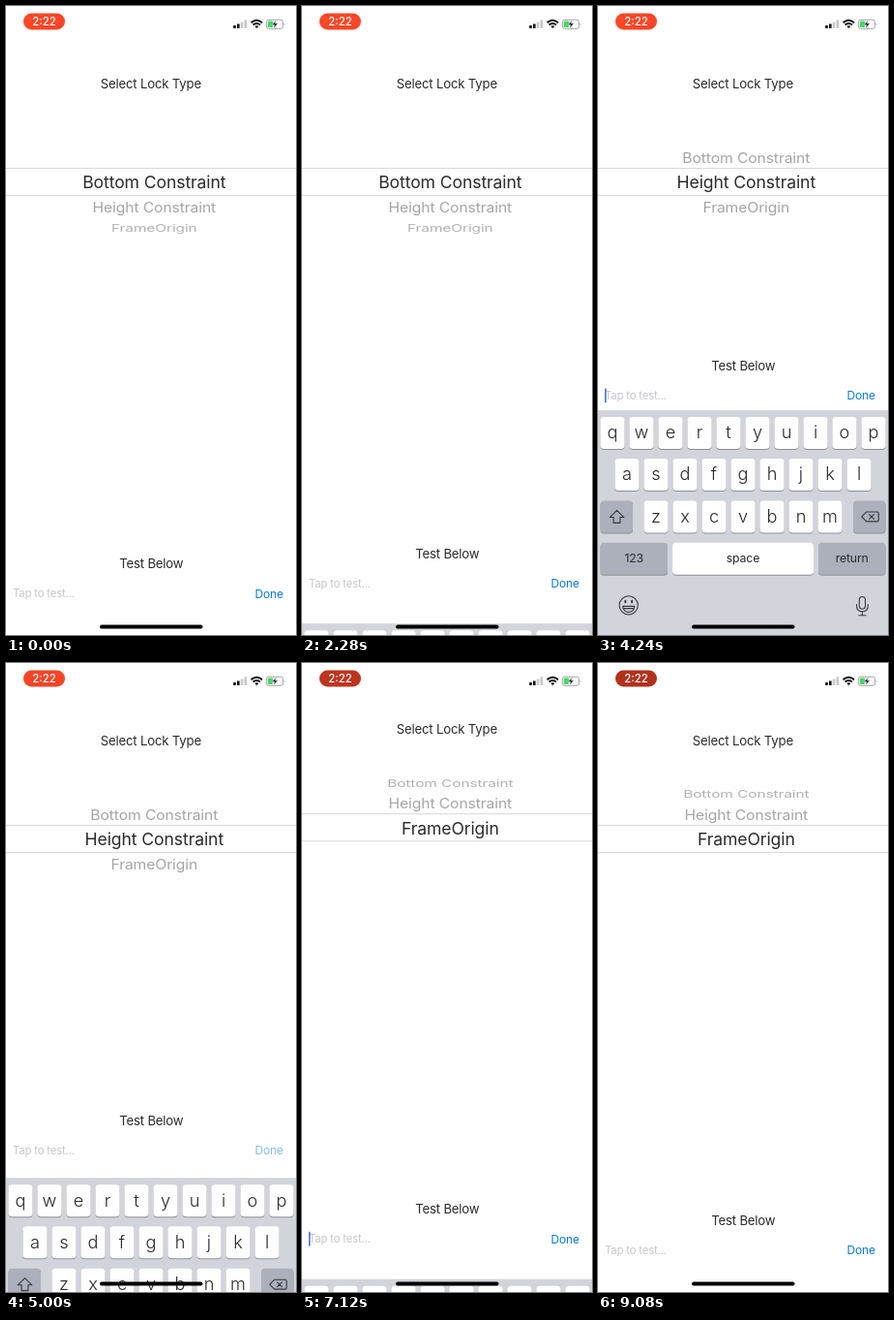
Recreate the animation shown at these times as an HTML page. Size 300 by 649 pixels, loop 9120 ms.

```html
<!DOCTYPE html>
<html lang="en">
<head>
<meta charset="utf-8">
<title>Keyboard lock demo</title>
<style>
  html, body { margin: 0; height: 100%; overflow: hidden; background: #fefefe; }
  svg { display: block; width: 100vw; height: 100vh; }
  text { font-family: Inter, Roboto, sans-serif; letter-spacing: -.014em; fill: #2b2b2e; }
  .mid { text-anchor: middle; }
  .label { font-size: 13.2px; }
  .item { font-size: 17.6px; letter-spacing: -.006em; }
  .letter { font-size: 18.2px; font-weight: 300; letter-spacing: 0; }
  .word { font-size: 12.3px; }
  .line { fill: none; stroke: #37383c; stroke-linecap: round; stroke-linejoin: round; }
</style>
</head>
<body>
<svg viewBox="0 0 300 649" preserveAspectRatio="none">
  <defs>
    <clipPath id="inLens"><rect y="168" width="300" height="27"/></clipPath>
    <clipPath id="offLens"><rect y="100" width="300" height="68"/><rect y="195" width="300" height="70"/></clipPath>
  </defs>

  <g id="page">
    <text class="mid label" x="149.8" y="84.6">Select Lock Type</text>
    <path d="M0 167.5H300M0 195.5H300" stroke="#d9d9dd"/>
    <g id="wheel" clip-path="url(#offLens)"></g>
    <g id="lens" clip-path="url(#inLens)"></g>
  </g>

  <g id="row">
    <text class="mid label" x="150.3" y="580.2">Test Below</text>
    <text x="7" y="610.2" font-size="11.3" style="fill:#c8c8cd">Tap to test...</text>
    <rect id="caret" x="7" y="598.5" width="1.6" height="15" rx=".8" fill="#4a6fd8"/>
    <text id="done" x="257.6" y="610.5" font-size="12" style="fill:#0b7ad8">Done</text>
  </g>

  <g id="keyboard">
    <rect y="416" width="300" height="234" fill="#d2d4db"/>
    <g id="keys"></g>
    <path class="line" stroke-width="1.1" d="M19.5 519.3l-7.3 7.2h3.9v5.8h6.8v-5.8h3.9z"/>
    <path class="line" stroke-width="1.1" d="M277.6 521h11.2q1.4 0 1.4 1.4v7q0 1.4-1.4 1.4h-11.2l-4.8-4.9zM280.6 523.6l4.8 4.7m0-4.7l-4.8 4.7"/>
    <g class="line" stroke-width="1.1">
      <circle cx="31.7" cy="617.3" r="9.6"/>
      <path d="M25.6 618.3h12.2q-.8 6-6.1 6t-6.1-6zM26.3 620.6h10.8"/>
      <path d="M28.3 612.6v1.6m6.8-1.6v1.6" stroke-width="1.9"/>
      <rect x="270.3" y="608.5" width="6.2" height="12.5" rx="3.1"/>
      <path d="M267.6 616.5v1.6q0 5.6 5.8 5.6t5.8-5.6v-1.6M273.4 623.7v4M269.8 627.7h7.2"/>
    </g>
  </g>

  <g id="status">
    <rect id="pill" x="18" y="7.4" width="43" height="17" rx="8.5"/>
    <text class="mid" x="39.5" y="19.9" font-size="11.4" font-weight="500" style="fill:#fff;letter-spacing:0">2:22</text>
    <path d="M235.2 20h2.6v3h-2.6zM239 18.4h2.6v4.6H239z" fill="#111"/>
    <path d="M242.8 16.5h2.6v6.5h-2.6zM246.6 14.3h2.6v8.7h-2.6z" fill="#c9c9cb"/>
    <path d="M253.6 17.3q5.7-5 11.4 0M255.6 19.5q3.7-3.1 7.4 0" fill="none" stroke="#111" stroke-width="1.9"/>
    <path d="M257.3 21q2-1.5 4 0l-2 2.1z" fill="#111"/>
    <rect x="269.4" y="14.2" width="17.2" height="9.2" rx="2.4" fill="none" stroke="#9c9ca0" stroke-width=".9"/>
    <path d="M287.7 17.2q1.6 1.5 0 3.2z" fill="#9c9ca0"/>
    <rect x="270.8" y="15.6" width="5.4" height="6.4" rx="1.2" fill="#45d765"/>
    <path d="M279.6 14.8l-4.4 4.7h2.6l-1 3.4 4.4-4.8h-2.7z" fill="#111" stroke="#fff" stroke-width=".4"/>
  </g>
  <rect x="97" y="638.6" width="106.5" height="4" rx="2" fill="#000"/>
</svg>

<script>
const LOOP = 9120;
const KEYBOARD_HEIGHT = 233, ROW_LIFT = 205;
const CENTER = 153.3, LENS_Y = 182;
const ITEMS = ["Bottom Constraint", "Height Constraint", "FrameOrigin"];
const SESSIONS = [
  { show: 1000, hide: 2022 },
  { show: 3827, hide: 4910 },
  { show: 7100, hide: 8080, movesPage: true }
];

const $ = id => document.getElementById(id);
const clamp = x => Math.max(0, Math.min(1, x));
const span = (t, from, to) => clamp((t - from) / (to - from));
const smooth = x => x * x * (3 - 2 * x);
const easeOut = x => smooth(1 - (1 - x) ** 1.6);

function add(parent, tag, attrs, text) {
  const el = document.createElementNS("http://www.w3.org/2000/svg", tag);
  for (const name in attrs) el.setAttribute(name, attrs[name]);
  if (text) el.textContent = text;
  return parent.appendChild(el);
}

function addKey(x, y, width, label, dark) {
  const box = { x, width, height: 33, rx: 3.8 };
  add($("keys"), "rect", { ...box, y: y + 1, fill: "#8d9097" });
  add($("keys"), "rect", { ...box, y, fill: dark ? "#abb0bb" : "#fefefe" });
  if (!label) return;
  const letter = label.length === 1;
  add($("keys"), "text", {
    class: "mid " + (letter ? "letter" : "word"),
    x: x + width / 2, y: y + (letter ? 22.4 : 20.4)
  }, label);
}

[["qwertyuiop", 15, 423], ["asdfghjkl", 30, 466], ["zxcvbnm", 60, 509.5]].forEach(([letters, x, y]) =>
  [...letters].forEach((c, i) => addKey(x + i * 30 - 12.6, y, 25.2, c)));
addKey(2.5, 509.5, 33.5, "", true);
addKey(264, 509.5, 33.5, "", true);
addKey(2.5, 552.7, 69.5, "123", true);
addKey(77, 552.7, 146, "space");
addKey(228, 552.7, 69.5, "return", true);

const makeItems = layer => ITEMS.map(name => add($(layer), "text", { class: "mid item", y: 6.4 }, name));
const wheelItems = makeItems("wheel"), lensItems = makeItems("lens");

// Places a row on the picker's cylinder.
function placeItem(el, offset, radius, scale) {
  const angle = offset * 0.4;
  const y = LENS_Y + radius * Math.sin(angle);
  el.setAttribute("transform",
    `translate(${CENTER} ${y}) scale(${scale} ${scale * Math.max(0.01, Math.cos(angle))})`);
}

function drawPicker(t) {
  const bounce = 0.04 * Math.sin(Math.PI * span(t, 5980, 6400));
  const position = easeOut(span(t, 2800, 3560)) + easeOut(span(t, 5540, 6130)) + bounce;
  ITEMS.forEach((_, i) => {
    const offset = i - position, far = Math.abs(offset);
    placeItem(wheelItems[i], offset, 65, 0.9 - 0.01 * far);
    wheelItems[i].style.fillOpacity = 0.48 - 0.06 * far;
    placeItem(lensItems[i], offset, 73, 1);
  });
}

// Critically damped spring.
function spring(ms) {
  const x = Math.max(0, ms) * 0.01826;
  return 1 - (1 + x) * Math.exp(-x);
}

function caretOpacity(ms) {
  const phase = ms % 1000;
  return phase < 500 ? 1 : 1 - span(phase, 500, 700) + span(phase, 850, 1000);
}

function doneOpacity(t, hide) {
  if (t < hide - 100) return 1;
  return 0.2 + 0.8 * span(t, hide, hide + 250);
}

function drawKeyboard(t) {
  const session = SESSIONS.findLast(s => t >= s.show);
  let raised = 0, caret = 0, done = 1;
  if (session) {
    const { show, hide } = session;
    raised = spring(t - show) - spring(t - hide);
    caret = t < hide ? caretOpacity(t - show) : 0;
    done = doneOpacity(t, hide);
  }
  const lift = ROW_LIFT * raised;
  $("keyboard").setAttribute("transform", `translate(0 ${KEYBOARD_HEIGHT * (1 - raised)})`);
  $("row").setAttribute("transform", `translate(0 ${-lift})`);
  $("page").setAttribute("transform", `translate(0 ${session && session.movesPage ? -lift : 0})`);
  $("caret").setAttribute("opacity", caret);
  $("done").setAttribute("opacity", done);
}

function drawPill(t) {
  const distance = (t % 1900 - 1500) / 190;
  const dim = 1 - 0.3 * Math.exp(-distance * distance);
  $("pill").setAttribute("fill", `rgb(${[253, 70, 39].map(c => Math.round(c * dim))})`);
}

function draw(t) {
  drawPicker(t);
  drawKeyboard(t);
  drawPill(t);
}

const start = performance.now();
function tick() {
  draw((performance.now() - start) % LOOP);
  requestAnimationFrame(tick);
}
tick();
</script>
</body>
</html>
```
